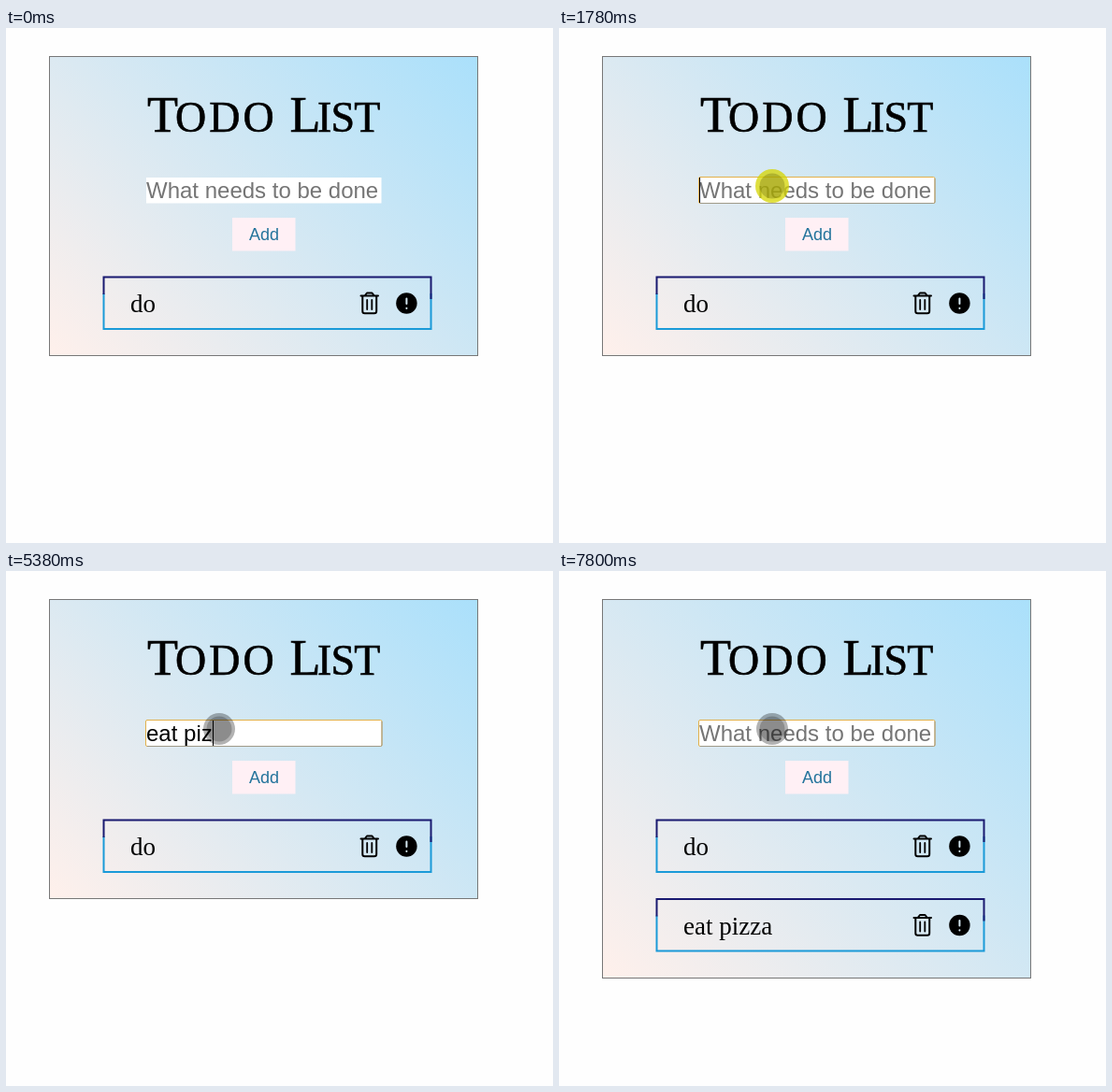
Animation, 585 px wide and 551 px high, one loop 8 s. Source, as an HTML page:

```html
<!DOCTYPE html>
<html lang="en">
<head>
<meta charset="utf-8">
<title>Todo list</title>
<style>
  html, body { margin: 0; width: 100%; height: 100%; overflow: hidden; background: #fefefe; }
  #panel {
    position: absolute; left: 46px; top: 30px; width: 459px; height: 321px;
    box-sizing: border-box; border: 1px solid #777;
    background: linear-gradient(45deg, #fff0eb, #aae0fb) border-box;
  }
  svg { position: absolute; left: 0; top: 0; display: block; }
  text { white-space: pre; }
  .title { font-family: "Liberation Serif", serif; stroke: #000; stroke-width: .6; }
  .big { font-size: 54px; }
  .small { font-size: 46px; }
  .field { font: 24px "Liberation Sans", Arial, sans-serif; }
  .button { font: 18px "Liberation Sans", Arial, sans-serif; fill: #24749c; }
  .item { font: 27px "Liberation Serif", Times, serif; }
  .line { fill: none; stroke-width: 2; }
</style>
</head>
<body>
<div id="panel"></div>
<svg width="585" height="551" viewBox="0 0 585 551">
  <defs>
    <g id="row">
      <path class="line" stroke="#1a9ad8" d="M104.5 284V322H454.5V284"/>
      <path class="line" stroke="#191970" d="M104.5 285V266.5H454.5V290"/>
      <g class="line" stroke="#000" stroke-linecap="round" stroke-linejoin="round">
        <path d="M379.5 286.5H398M384 286L386 283.5H391.5L393.5 286"/>
        <path d="M381.3 287V303Q381.3 305.3 383.6 305.3H393.9Q396.2 305.3 396.2 303V287"/>
        <path stroke-width="1.8" d="M386.2 291V301M391.3 291V301"/>
      </g>
      <circle cx="428.4" cy="294.5" r="11.2"/>
      <path class="line" stroke="#d4e6ef" stroke-width="3.2" stroke-linecap="round" d="M428.4 289.5V295M428.4 299.8V299.9"/>
    </g>
  </defs>

  <g class="title">
    <text class="big" x="151" y="111">T</text>
    <text class="small" x="181" y="111" letter-spacing="3">ODO</text>
    <text class="big" x="303.500" y="111">L</text>
    <text class="small" x="333" y="111" letter-spacing="-.8">IST</text>
  </g>

  <rect x="150" y="160" width="251.500" height="27.500" fill="#fff"/>
  <g id="focus" fill="none">
    <rect x="149.500" y="159.500" width="252.500" height="28" rx="1.500" fill="#fff" stroke="#e2b04a"/>
    <path d="M402 161V186Q402 187.500 400.500 187.500H151" stroke="#a09a88"/>
  </g>
  <text id="hint" class="field" x="150" y="182" fill="#757575">What needs to be done</text>
  <text id="typed" class="field" x="150" y="182"></text>
  <rect id="caret" y="160" width="1" height="27"/>

  <rect x="242" y="203" width="67.500" height="35.500" fill="#fff0f5"/>
  <text class="button" x="260" y="227">Add</text>

  <use href="#row"/>
  <text class="item" x="133" y="304">do</text>
  <g id="added">
    <use href="#row" y="84.500"/>
    <text class="item" x="133" y="388.500">eat pizza</text>
  </g>

  <g id="pointer">
    <circle id="halo"/>
    <circle id="core" r="13.500"/>
  </g>
</svg>
<script>
const LOOP = 8000;
const el = id => document.getElementById(id);
const show = (id, on) => { el(id).style.display = on ? "" : "none"; };

// Each step lists only what changes at that time.
const steps = [
  [0, { pos: null, press: false, focus: false, caret: false, text: "", added: false }],
  [200, { pos: [502, 494] }],
  [390, { pos: [405, 300] }],
  [580, { pos: [320, 155] }],
  [770, { pos: [270, 143] }],
  [970, { pos: [235, 161] }],
  [1170, { pos: [228, 169] }],
  [1370, { press: true }],
  [1780, { focus: true, caret: true }],
  [1980, { press: false }],
  [2180, { caret: false }],
  [2770, { caret: true }],
  [3170, { text: "e" }],
  [3390, { text: "ea" }],
  [3590, { text: "eat" }],
  [3990, { text: "eat " }],
  [4380, { text: "eat p" }],
  [4580, { text: "eat pi" }],
  [5180, { caret: false }],
  [5380, { text: "eat piz", caret: true }],
  [5580, { text: "eat pizz" }],
  [6180, { text: "eat pizza" }],
  [6600, { text: "", added: true, caret: false }],
  [7200, { caret: true }],
  [7600, { press: true }],
  [7800, { press: false, caret: false }]
];

function stateAt(time) {
  return Object.assign({}, ...steps.filter(([start]) => start <= time).map(([, change]) => change));
}

function draw(s) {
  show("focus", s.focus);
  show("hint", !s.text);
  show("caret", s.caret);
  show("added", s.added);
  show("pointer", s.pos);
  el("panel").style.height = (s.added ? 406 : 321) + "px";

  el("typed").textContent = s.text;
  const width = s.text ? el("typed").getComputedTextLength() : 0;
  el("caret").setAttribute("x", Math.round(150 + width));

  if (s.pos) el("pointer").setAttribute("transform", `translate(${s.pos})`);
  el("halo").setAttribute("r", s.press ? 18 : 17);
  el("halo").setAttribute("fill", s.press ? "rgba(212,212,0,.75)" : "rgba(0,0,0,.3)");
  el("core").setAttribute("fill", s.press ? "rgba(60,60,0,.24)" : "rgba(0,0,0,.21)");
}

const begin = performance.now();
function tick() {
  draw(stateAt((performance.now() - begin) % LOOP));
  requestAnimationFrame(tick);
}
tick();
</script>
</body>
</html>
```
